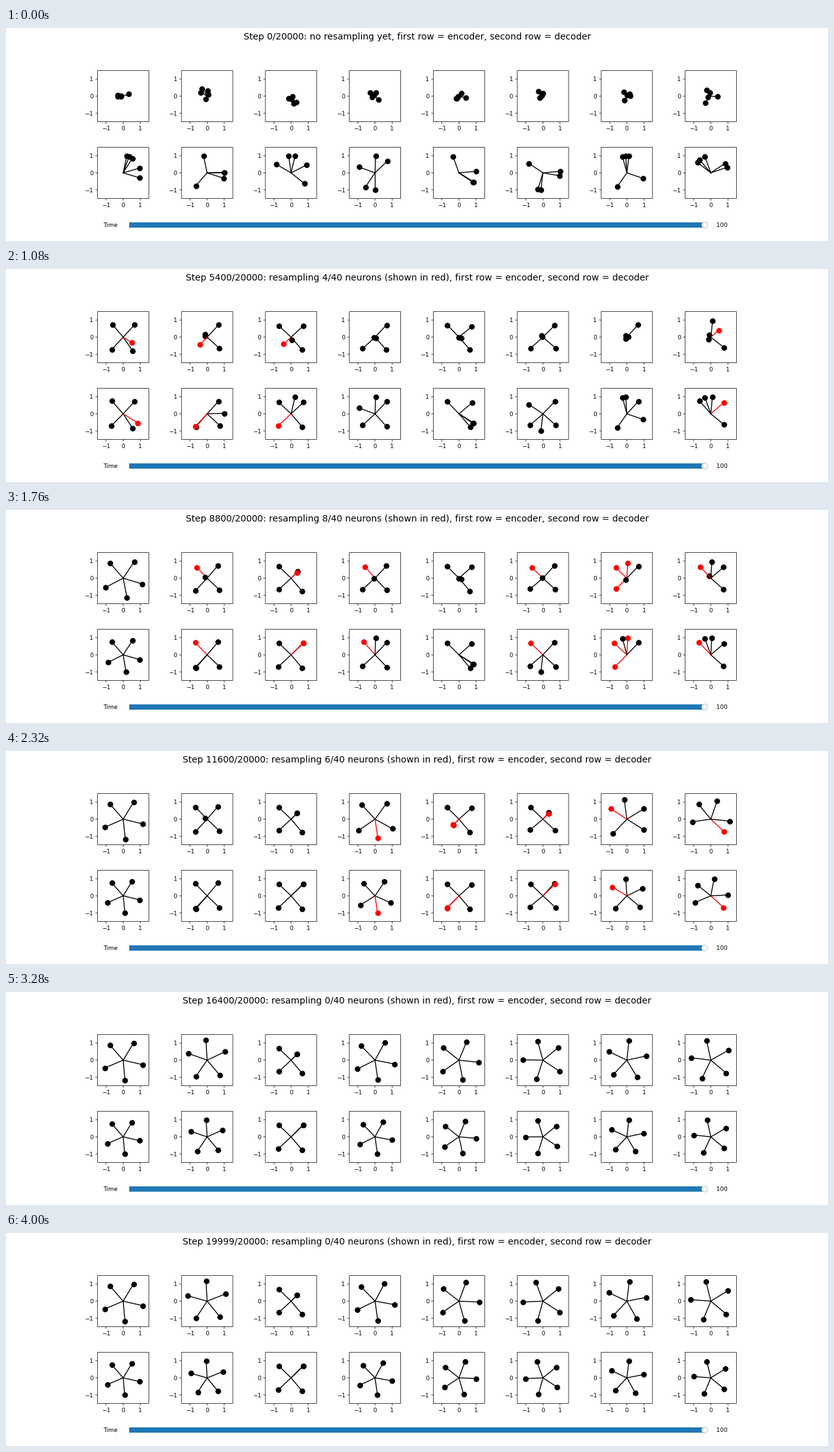
A matplotlib script that plays this animation: 1280x333 px, repeating every 4.04 s.

```python
import numpy as np
import matplotlib.pyplot as plt
from matplotlib.animation import FuncAnimation
from matplotlib.patches import Circle, Rectangle

W, H = 1280, 333
FRAMES, INTERVAL = 101, 40
PT = 0.72                          # points per pixel at 100 dpi
LABEL = 9.29                       # label size in pixels
BLUE = "#1f77b4"

# Grid of 2 x 8 square panels
SIDE = 0.6 * H / 2.5
UNIT = SIDE / 3
CELL = 0.8 * W / 9.4
COLS = 0.1 * W + CELL * (0.5 + 1.2 * np.arange(8))
ROWS = (0.2 * H + SIDE / 2, 0.8 * H - SIDE / 2)

RESAMPLE = (13, 25, 38, 50, 63, 75, 88)
NEVER = FRAMES

# Each panel: first decoder angles, angles to settle at, frames of waking
# (0 = alive at once), then pentagon phase and the frame it starts to form.
PANELS = [
    ((58, 70, -17, 16, 78), (47, 134, -140, -60, -32), (0, 0, 0, 0, 25),
     -157, 28),
    ((0, -18, 2, -131, 102), (50, -44, 134, 95, -133), (0, 0, 38, 63, 25),
     -123, 63),
    ((150, 27, -39, 98, 77), (136, 44, -50, -137, 45), (0, 0, 0, 25, 38),
     0, NEVER),
    ((44, -124, -89, 160, 88), (47, -138, -46, 131, -81), (0, 0, 0, 38, 50),
     -154, 50),
    ((110, 5, -33, -32, -34), (135, 42, -50, -135, -134), (0, 0, 0, 50, 50),
     -146, 58),
    ((5, -107, -10, 146, -97), (48, -140, -43, 136, 44), (0, 0, 0, 38, 50),
     -105, 58),
    ((83, 94, -19, -125, 105), (46, 87, 137, -135, 139), (0, 38, 38, 38, 50),
     -133, 44),
    ((34, 110, 19, 142, 131), (87, -47, -42, 41, 133), (0, 50, 0, 25, 38),
     -40, 50),
]


def unit(angle):
    a = np.radians(angle)
    return np.stack([np.cos(a), np.sin(a)], axis=-1)


def simulate(first, settle, wake, phase, spread, rng):
    """Encoder and decoder tips of one panel, for every frame."""
    settle, wake = np.array(settle), np.array(wake)
    pentagon = phase + 72 * np.argsort(np.argsort(settle))
    angle = np.array(first, float)
    enc = rng.normal(0, 0.2, (5, 2))
    rest = 0.35 * enc              # where silent encoders shrink to
    history = []
    for f in range(FRAMES):
        alive = wake <= f
        if f > 0:
            reset = wake == f
            angle[reset] = settle[reset]
            enc[reset] = 0.2 * unit(angle[reset])
        history.append((enc.copy(), unit(angle)))

        # Neurons that share a direction also share its strength
        apart = np.abs((angle[:, None] - angle + 180) % 360 - 180)
        crowd = np.maximum(((apart < 15) & alive).sum(axis=1), 1)
        length = (1.17 if f >= spread else 0.98) / crowd
        goal = pentagon if f >= spread else settle
        angle += 0.11 * (goal - angle) * alive
        aim = np.where(alive[:, None], length[:, None] * unit(angle), rest)
        enc += 0.3 * (aim - enc)
    return history


rng = np.random.default_rng(4)
paths = [simulate(*panel, rng) for panel in PANELS]
wakes = np.array([panel[2] for panel in PANELS])

fig = plt.figure(figsize=(W / 100, H / 100), dpi=100, facecolor="white")
ax = fig.add_axes([0, 0, 1, 1])
ax.set_xlim(0, W)
ax.set_ylim(H, 0)
ax.axis("off")


def text(x, y, s, size=LABEL, **kw):
    return ax.text(x, y, s, fontsize=size * PT, family="DejaVu Sans", **kw)


def line(xs, ys, width, **kw):
    return ax.plot(xs, ys, lw=width * PT, color="black", **kw)[0]


def bar(x, y, w, h, color):
    ax.add_patch(Rectangle((x, y), w, h, fc=color, lw=0, snap=False))


def draw_panel(cx, cy):
    left, bottom = cx - SIDE / 2, cy + SIDE / 2
    ax.add_patch(Rectangle((left, cy - SIDE / 2), SIDE, SIDE, fill=False,
                           lw=0.74 * PT, ec="black", zorder=3, snap=False))
    tick = dict(solid_capstyle="butt", snap=False)
    for v, s in ((-1, "\u22121"), (0, "0"), (1, "1")):
        x, y = cx + v * UNIT, cy - v * UNIT
        line([x, x], [bottom, bottom + 3.25], 0.74, **tick)
        line([left - 3.25, left], [y, y], 0.74, **tick)
        text(x, bottom + 6.5, s, ha="center", va="top")
        text(left - 6.5, y, s, ha="right", va="center_baseline")


def draw_slider():
    left, width, mid = 0.15 * W, 0.7 * W, 0.925 * H
    height = 0.025 * H
    bar(left, mid - height / 2, width, height, BLUE)
    bar(left, mid - height / 2, 0.8, height, "red")
    ax.add_patch(Circle((left + width, mid), 4.65, fc="white", ec="0.75",
                        lw=0.93 * PT, zorder=3))
    text(left - 0.02 * width, mid, "Time", ha="right", va="center")
    text(left + 1.02 * width, mid, "100", ha="left", va="center")


title = text(W / 2, 0.02 * H, "", 13.98, ha="center", va="top")
draw_slider()
arms = {}
for p, cx in enumerate(COLS):
    for row, cy in enumerate(ROWS):
        draw_panel(cx, cy)
        for n in range(5):
            arms[p, row, n] = line([], [], 1.39, marker="o", markevery=[1],
                                   ms=8.8 * PT, mew=0)


def update(f):
    latest = max((r for r in RESAMPLE if r <= f), default=None)
    red = wakes == (latest or -1)
    note = (f"resampling {red.sum()}/40 neurons (shown in red)" if latest
            else "no resampling yet")
    title.set_text(f"Step {min(200 * f, 19999)}/20000: {note}, "
                   "first row = encoder, second row = decoder")
    for (p, row, n), arm in arms.items():
        x, y = paths[p][f][row][n] * UNIT
        cx, cy = COLS[p], ROWS[row]
        arm.set_data([cx, cx + x], [cy, cy - y])
        arm.set_color("red" if red[p, n] else "black")
    return [title, *arms.values()]


anim = FuncAnimation(fig, update, frames=FRAMES, interval=INTERVAL,
                     init_func=lambda: update(0), repeat=True,
                     repeat_delay=0, blit=False)
plt.show()
```
